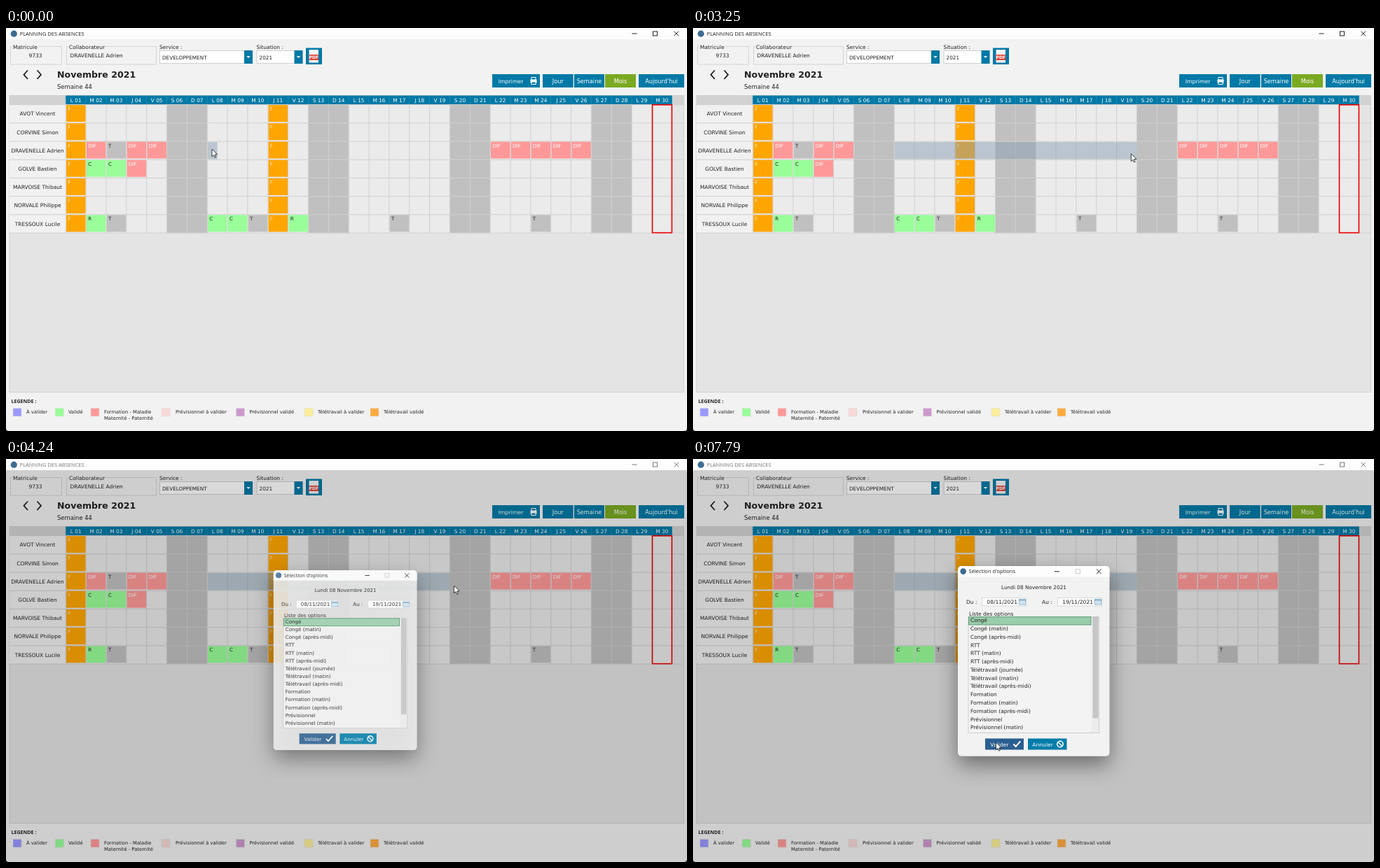
An HTML page with a canvas for the animation above (8 s loop, 972 px wide and 576 px high).

```html
<!DOCTYPE html>
<html lang="fr">
<head>
<meta charset="utf-8">
<title>Planning des absences</title>
<style>
html, body { margin: 0; width: 100%; height: 100%; overflow: hidden; background: #111; }
canvas { display: block; border-radius: 0 0 4px 4px; }
</style>
</head>
<body>
<canvas width="972" height="576"></canvas>
<script>
const ctx = document.querySelector('canvas').getContext('2d');
const LOOP = 8000;
const SANS = '"DejaVu Sans", sans-serif', UI = '"Open Sans", sans-serif';
const BLUE = '#0079a6', INK = '#222';
const LEFT = 85.3, TOP = 109.6, DAY_W = 28.85, ROW_H = 26.2;
const dayX = day => LEFT + (day - 1) * DAY_W;

const people = ['AVOT Vincent', 'CORVINE Simon', 'DRAVENELLE Adrien', 'GOLVE Bastien',
  'MARVOISE Thibaut', 'NORVALE Philippe', 'TRESSOUX Lucile'];
const kinds = {
  F: ['#ffa500', '#ffe9c0'], DIF: ['#ff9999', '#fff'], T: ['#c0c0c0', INK],
  C: ['#99ff99', INK], R: ['#99ff99', INK]
};
const absences = [
  [2, 'DIF', [2, 4, 5, 22, 23, 24, 25, 26]], [2, 'T', [3]],
  [3, 'C', [2, 3]], [3, 'DIF', [4]],
  [6, 'R', [2, 12]], [6, 'T', [3, 10, 17, 24]], [6, 'C', [8, 9]]
];
const legend = [
  [9.5, 29, '#9999ff', 'À valider'], [69.7, 89, '#99ff99', 'Validé'],
  [120.5, 140, '#ff9999', 'Formation - Maladie'], [221.5, 242, '#f8d8d8', 'Prévisionnel à valider'],
  [328, 347.5, '#cc99cc', 'Prévisionnel validé'], [425.5, 445, '#fbee99', 'Télétravail à valider'],
  [519.5, 539, '#ffaa40', 'Télétravail validé']
];
const options = ['Congé', 'Congé (matin)', 'Congé (après-midi)', 'RTT', 'RTT (matin)', 'RTT (après-midi)',
  'Télétravail (journée)', 'Télétravail (matin)', 'Télétravail (après-midi)', 'Formation',
  'Formation (matin)', 'Formation (après-midi)', 'Prévisionnel', 'Prévisionnel (matin)'];

// Pointer path: time, x, y
const path = [
  [350, 294, 173], [770, 350, 173], [1150, 417, 173.5], [1970, 607.5, 174], [2020, 610.5, 174],
  [2160, 618.5, 174], [2330, 618.5, 174], [2440, 621.5, 174], [2850, 621.5, 173], [3220, 621.5, 173],
  [3410, 645, 214], [3580, 686, 176], [3770, 639.5, 181], [4400, 639.5, 181],
  [4730, 621, 207], [4860, 600, 217.5], [5530, 454, 239], [5800, 422, 235], [6160, 410.5, 232.5],
  [6580, 410.5, 232.5], [6610, 410.5, 236], [7390, 427.5, 393.5], [7580, 459, 402], [7790, 432.5, 405]
];
const presses = [[50, 3100], [3940, 4050]];
const SELECTION_LAG = 40, DIALOG_OPEN = 4150;

const clamp = v => Math.min(1, Math.max(0, v));

function pointerAt(t) {
  const i = path.findIndex(p => p[0] > t);
  if (i < 0) return path[path.length - 1].slice(1);
  if (i === 0) return path[0].slice(1);
  const [a, b] = [path[i - 1], path[i]], k = (t - a[0]) / (b[0] - a[0]);
  return [a[1] + (b[1] - a[1]) * k, a[2] + (b[2] - a[2]) * k];
}

function rect(x, y, w, h, fill, stroke, width = 1) {
  if (fill) { ctx.fillStyle = fill; ctx.fillRect(x, y, w, h); }
  if (stroke) { ctx.strokeStyle = stroke; ctx.lineWidth = width; ctx.strokeRect(x, y, w, h); }
}

function text(s, x, y, size = 7.5, color = INK, align = 'left', font = SANS, weight = '') {
  ctx.font = `${weight} ${size}px ${font}`;
  ctx.fillStyle = color;
  ctx.textAlign = align;
  ctx.fillText(s, x, y);
}

function line(points, color, width = 1) {
  ctx.beginPath();
  points.forEach(p => ctx.lineTo(...p));
  ctx.strokeStyle = color;
  ctx.lineWidth = width;
  ctx.stroke();
}

function disc(x, y, r, color) {
  ctx.beginPath();
  ctx.arc(x, y, r, 0, 7);
  ctx.fillStyle = color;
  ctx.fill();
}

function button(x, y, w, h, fill, label, labelX = x + w / 2, align = 'center', size = 8.2) {
  rect(x, y, w, h, fill);
  text(label, labelX, y + h / 2 + 3, size, '#fff', align);
}

function windowButtons(y, min, max, close, color, maxColor = color) {
  line([[min, y], [min + 7, y]], color);
  rect(max + .5, y - 3, 6, 6, null, maxColor);
  line([[close, y - 3.3], [close + 6.6, y + 3.3]], color);
  line([[close + 6.6, y - 3.3], [close, y + 3.3]], color);
}

function combo(label, x, w, value) {
  text(label, x, 29.8);
  rect(x + .5, 32.5, w - 1, 18, '#fff', '#d0d0d0');
  text(value, x + 4, 45, 7.3);
  const bx = x + w - 12;
  rect(bx, 32, 12, 19, BLUE);
  ctx.beginPath();
  ctx.moveTo(bx + 3.3, 40); ctx.lineTo(bx + 8.7, 40); ctx.lineTo(bx + 6, 43);
  ctx.fillStyle = '#fff';
  ctx.fill();
}

function group(label, x, w, value, valueX, align) {
  rect(x + .5, 26.5, w, 25.5, null, '#d4d4d4');
  rect(x + 3, 24, label.length * 4 + 1, 6, '#f2f2f2');
  text(label, x + 4, 29.8);
  text(value, valueX, 42.3, 7.5, INK, align);
}

function toolbar() {
  group('Matricule', 6, 73, '9733', 42, 'center');
  group('Collaborateur', 86, 128, people[2], 91.5);
  combo('Service :', 219, 133, 'DEVELOPPEMENT');
  combo('Situation :', 357.5, 66, '2021');
  rect(428, 28.5, 23, 23.5, BLUE);
  rect(432.5, 31, 13.5, 18.5, '#f4f4f4');
  rect(432.5, 38, 13.5, 8, '#e04a3f');
  text('PDF', 439.3, 44.4, 6, '#fff', 'center', SANS, 'bold');

  line([[31, 60.5], [25.5, 66.7], [31, 73]], INK, 1.8);
  line([[44.5, 60.5], [50, 66.7], [44.5, 73]], INK, 1.8);
  text('Novembre 2021', 73, 71, 12.6, INK, 'left', SANS, 'bold');
  text('Semaine 44', 73, 87.2, 8.4);

  button(694, 66, 68, 19, BLUE, 'Imprimer', 702.7, 'left', 7.8);
  rect(750, 70.5, 6, 4, null, '#fff');
  rect(748.5, 73.5, 9, 5, '#fff');
  rect(750, 77, 6, 3.5, BLUE, '#fff');
  button(766, 66, 43.7, 19, BLUE, 'Jour');
  button(811, 66, 43, 19, BLUE, 'Semaine');
  button(855, 66, 44, 19, '#7aaa22', 'Mois');
  button(903, 66, 65, 19, BLUE, "Aujourd'hui");
}

function cell(row, day, kind) {
  const [fill, color] = kinds[kind], x = dayX(day), y = TOP + row * ROW_H;
  rect(x + .8, y + .5, DAY_W - 1.4, 24, fill);
  text(kind, x + 3, y + 8.5, 7.2, color);
}

function planning() {
  const bottom = TOP + 7 * ROW_H, right = dayX(31);
  rect(5, 96.5, 962.5, 424, '#e4e4e4', '#d0d0d0');
  rect(5, 96.5, 80, 13, '#d2d2d2');
  rect(right, 96.5, 16.5, 13, '#d2d2d2');
  rect(5, TOP, 80, bottom - TOP, '#f1f1f1');
  rect(LEFT, TOP, right - LEFT, bottom - TOP, '#ebebeb');
  rect(LEFT, 96.5, right - LEFT, 13, BLUE);
  for (let day = 1; day <= 30; day++) {
    const weekday = (day - 1) % 7, x = dayX(day);
    if (weekday > 4) rect(x, TOP, DAY_W, bottom - TOP, '#c0c0c0');
    line([[x, TOP], [x, bottom]], '#d0d0d0');
    line([[x, 97], [x, 109]], '#3a94b8', .6);
    text('LMMJVSD'[weekday] + ' ' + String(day).padStart(2, 0), x + DAY_W / 2, 105.8, 7.4, '#fff', 'center');
  }
  line([[right, TOP], [right, bottom]], '#d0d0d0');
  for (let row = 0; row <= 7; row++) {
    const y = TOP + row * ROW_H;
    line([[5, y], [967, y]], '#d0d0d0');
    if (row === 7) break;
    text(people[row], 45, y + 15.8, 7.5, INK, 'center');
    cell(row, 1, 'F');
    cell(row, 11, 'F');
  }
  for (const [row, kind, days] of absences) days.forEach(day => cell(row, day, kind));
  rect(dayX(30) + .6, TOP + .2, DAY_W - 1, bottom - TOP - .6, null, '#f00000', 1.6);
}

function legendBar() {
  text('LEGENDE :', 7.5, 535.5, 7.1, INK, 'left', UI, 'bold');
  for (const [x, labelX, color, label] of legend) {
    rect(x + .5, 543.5, 12, 11.5, color, '#dcdcdc', .6);
    text(label, labelX, 550.5, 6.8);
  }
  text('Maternité - Paternité', 140, 560, 6.8);
}

// The selection grows by half days, slightly behind the pointer
function selection(t) {
  const x = pointerAt(Math.min(t, presses[0][1]) - SELECTION_LAG)[0], half = DAY_W / 2;
  const end = LEFT + Math.ceil((x - LEFT) / half) * half;
  rect(288, 163, end - 288, 24.5, 'rgba(137,160,180,.5)');
}

function dateField(label, labelX, x, value) {
  text(label, labelX, 206.6);
  rect(x + .5, 198.5, 63, 11.5, '#fff', '#d8d8d8');
  text(value, x + 7.3, 206.8, 7.6);
  rect(x + 53.5, 200.5, 9, 7.5, '#eef5fa', '#6fa3c4', .8);
  line([[x + 53.5, 202], [x + 62.5, 202]], '#4a87b0');
  ctx.setLineDash([1, 1.3]);
  line([[x + 55, 204.3], [x + 61.5, 204.3]], '#6fa3c4');
  line([[x + 55, 206.3], [x + 61.5, 206.3]], '#6fa3c4');
  ctx.setLineDash([]);
}

function roundBox(x, y, w, h, radii, fill) {
  ctx.beginPath();
  ctx.roundRect(x, y, w, h, radii);
  ctx.fillStyle = fill;
  ctx.fill();
}

function dialog(t) {
  const p = clamp((t - DIALOG_OPEN - 30) / 240);
  if (!p) return;
  const eased = 1 - (1 - p) ** 3, scale = .87 + .13 * eased;
  ctx.save();
  ctx.translate(486.25 - 5 * (1 - eased), 288.75 - 3 * (1 - eased));
  ctx.scale(scale, scale);
  ctx.translate(-486.25, -288.75);
  ctx.globalAlpha = clamp(p * 3.4);

  ctx.shadowColor = 'rgba(0,0,0,.45)';
  ctx.shadowBlur = 30;
  ctx.shadowOffsetY = 12;
  roundBox(378, 153, 216.5, 271.7, 5, '#f2f2f2');
  ctx.shadowColor = 'transparent';
  roundBox(378, 153, 216.5, 15.5, [5, 5, 0, 0], '#fdfdfd');

  disc(385.7, 160.6, 4.3, '#3d6c93');
  text("Sélection d'options", 393.5, 163.4, 7.6, INK, 'left', UI);
  windowButtons(160.8, 516, 546, 576, INK, '#ccc');
  text('Lundi 08 Novembre 2021', 486.5, 186, 7.35, INK, 'center');
  dateField('Du :', 390, 412, '08/11/2021');
  dateField('Au :', 498, 520, '19/11/2021');
  text('Liste des options', 394, 223.8);

  rect(393, 225.5, 186.5, 166, '#f3f3f3', '#cfcfcf');
  rect(568.5, 226, 10.5, 165, '#ececec');
  rect(571, 226, 7, 144, '#c6c6c6', '#b4b4b4', .6);
  rect(393.5, 225.7, 174.5, 11.3, '#9acdab', '#5f9a78');
  options.forEach((label, i) => text(label, 396, 233.2 + i * 11.78));

  button(417, 399.5, 55, 16, '#2a5f90', 'Valider', 424.3, 'left', 7.6);
  line([[457.5, 407.5], [460.7, 411], [467.3, 403.3]], '#fff', 2);
  button(478, 399.5, 55.5, 16, '#007ca9', 'Annuler', 484.3, 'left', 7.6);
  ctx.beginPath();
  ctx.arc(524, 407.5, 4.2, 0, 7);
  ctx.strokeStyle = '#fff';
  ctx.lineWidth = 1.6;
  ctx.stroke();
  line([[521.2, 404.7], [526.8, 410.3]], '#fff', 1.6);
  ctx.restore();
}

function pointer(t) {
  const [x, y] = pointerAt(t);
  if (presses.some(([down, up]) => t >= down && t < up)) disc(x - .5, y - .3, 8.3, 'rgba(230,232,50,.72)');
  ctx.save();
  ctx.translate(x, y);
  ctx.beginPath();
  for (const p of [[0, 0], [0, 10.8], [2.5, 8.6], [4.1, 12.2], [5.8, 11.4], [4.2, 7.9], [7.6, 7.7]]) ctx.lineTo(...p);
  ctx.closePath();
  ctx.fillStyle = '#fff';
  ctx.fill();
  ctx.strokeStyle = '#111';
  ctx.lineWidth = .8;
  ctx.stroke();
  ctx.restore();
}

function draw(t) {
  const modal = t >= DIALOG_OPEN, titleColor = modal ? '#777' : INK;
  rect(0, 0, 972, 576, '#f2f2f2');
  toolbar();
  planning();
  selection(t);
  legendBar();
  if (modal) rect(0, 16, 972, 560, 'rgba(0,0,0,.15)');
  rect(0, 0, 972, 16, '#fdfdfd');
  disc(11.3, 8.2, 4.6, '#3d6c93');
  text('PLANNING DES ABSENCES', 19.7, 11, 7.5, titleColor, 'left', UI);
  windowButtons(8, 893.5, 923, 953.5, titleColor);
  dialog(t);
  pointer(t);
}

function tick(now) {
  draw(now % LOOP);
  requestAnimationFrame(tick);
}
requestAnimationFrame(tick);
</script>
</body>
</html>
```
